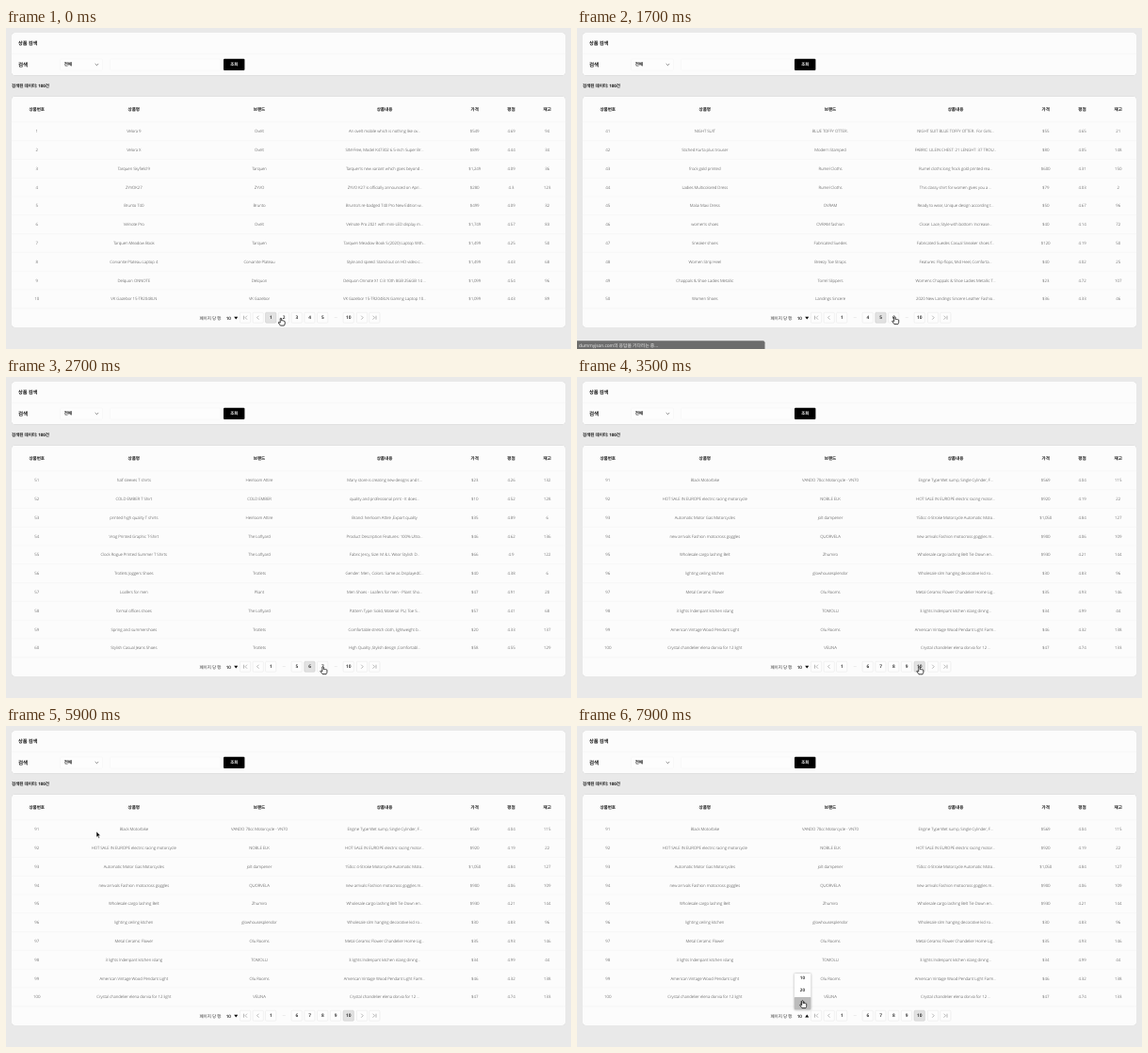
These frames come from a looping animation (600 by 341 pixels, 8 s). An HTML page:

```html
<!DOCTYPE html>
<html lang="ko">
<head>
<meta charset="utf-8">
<title>상품 검색</title>
<style>
html, body { margin: 0; width: 100%; height: 100%; overflow: hidden; background: #e9e9e9; }
svg { display: block; width: 600px; height: 341px; }
text {
  font-family: "Open Sans", "Noto Sans CJK KR", "Noto Sans CJK JP", "Noto Sans CJK", sans-serif;
  text-rendering: geometricPrecision; letter-spacing: -.02em; fill: #111;
}
.cell { font-weight: 300; fill: #333; }
.bold { font-weight: 700; }
.semi { font-weight: 600; }
.line { fill: none; stroke: #333; stroke-width: .6; }
.dim { stroke: #888; }
.card { fill: #fcfcfc; filter: drop-shadow(0 .7px .6px rgba(0, 0, 0, .28)); }
.rule { stroke: #f1f1f1; stroke-width: .5; }
.box { fill: #fdfdfd; stroke: #e4e4e4; stroke-width: .5; }
.on { fill: #e2e2e2; stroke: #c4c4c4; }
.field { fill: #fdfdfd; stroke: #f3f3f3; stroke-width: .5; }
.popup { fill: #fff; filter: drop-shadow(0 .5px 1px rgba(0, 0, 0, .35)); }
</style>
</head>
<body>
<svg id="stage" viewBox="0 0 600 341"></svg>
<script>
const LOOP = 8000, STEP = 100;
const COLS = [32.7, 135.8, 269, 402, 497.7, 536.5, 574.7];
const HEADS = ['상품번호', '상품명', '브랜드', '상품내용', '가격', '평점', '재고'];

// title | brand | description | price | rating | stock
const PAGES = {
  1: `Velora 9|Ovelt|An ovelt mobile which is nothing like ov...|549|4.69|94
Velora X|Ovelt|SIM-Free, Model K47302 6.5-inch Super Br...|899|4.44|34
Tarquen Skyfield 9|Tarquen|Tarquen's new variant which goes beyond ...|1,249|4.09|36
ZYVOK27|ZYVO|ZYVO K27 is officially announced on Apri...|280|4.3|123
Brunto T40|Brunto|Brunto's re-badged T40 Pro New Edition w...|499|4.09|32
Velnote Pro|Ovelt|Velnote Pro 2021 with mini-LED display m...|1,749|4.57|83
Tarquen Meadow Book|Tarquen|Tarquen Meadow Book S (2020) Laptop With...|1,499|4.25|50
Corvanite Plateau Laptop 4|Corvanite Plateau|Style and speed. Stand out on HD video c...|1,499|4.43|68
Delquon ONNOTE|Delquon|Delquon Onnote X1 Ci3 10th 8GB 256GB 14 ...|1,099|4.54|96
VK Gazebor 15-TR2048LN|VK Gazebor|VK Gazebor 15-TR2048LN Gaming Laptop 10...|1,099|4.43|89`,
  5: `NIGHT SUIT|BLUE TOFFY OTTER..|NIGHT SUIT BLUE TOFFY OTTER.. For Girls...|55|4.65|21
Stiched Kurta plus trouser|Modern Stamped|FABRIC: LILEIN CHEST: 21 LENGHT: 37 TROU...|80|4.05|148
frock gold printed|Rumel Cloths|Rumel cloths long frock gold printed rea...|600|4.31|150
Ladies Multicolored Dress|Rumel Cloths|This classy shirt for women gives you a ...|79|4.03|2
Malai Maxi Dress|OVRAM|Ready to wear, Unique design according t...|50|4.67|96
women's shoes|OVRAM fashion|Close: Lace, Style with bottom: Increase...|40|4.14|72
Sneaker shoes|Fabricated Suedes|Fabricated Suedes Casual Sneaker shoes f...|120|4.19|50
Women Strip Heel|Breezy Toe Straps|Features: Flip-flops, Mid Heel, Comforta...|40|4.02|25
Chappals &amp; Shoe Ladies Metallic|Torrel Slippers|Womens Chappals &amp; Shoe Ladies Metallic T...|23|4.72|107
Women Shoes|Landings Sincere|2020 New Landings Sincere Leather Fashio...|36|4.33|46`,
  6: `half sleeves T shirts|Heirloom Attire|Many store is creating new designs and t...|23|4.26|132
COLD EMBER T Shirt|COLD EMBER|quality and professional print - It does...|10|4.52|128
printed high quality T shirts|Heirloom Attire|Brand: heirloom Attire ,Export quality|35|4.89|6
Vrog Printed Graphic T-Shirt|The Loftyard|Product Description Features: 100% Ultra...|46|4.62|136
Clock Rogue Printed Summer T Shirts|The Loftyard|Fabric Jercy, Size: M &amp; L Wear Stylish D...|66|4.9|122
Trotlets Joggers Shoes|Trotlets|Gender: Men , Colors: Same as DisplayedC...|40|4.38|6
Loafers for men|Pliant|Men Shoes - Loafers for men - Pliant Sho...|47|4.91|20
formal offices shoes|The Loftyard|Pattern Type: Solid, Material: PU, Toe S...|57|4.41|68
Spring and summershoes|Trotlets|Comfortable stretch cloth, lightweight b...|20|4.33|137
Stylish Casual Jeans Shoes|Trotlets|High Quality ,Stylish design ,Comfortabl...|58|4.55|129`,
  10: `Black Motorbike|VANDO 70cc Motorcycle - VN70|Engine Type:Wet sump, Single Cylinder, F...|569|4.04|115
HOT SALE IN EUROPE electric racing motorcycle|NOBLE ELK|HOT SALE IN EUROPE electric racing motor...|920|4.19|22
Automatic Motor Gas Motorcycles|jolt dampener|150cc 4-Stroke Motorcycle Automatic Moto...|1,050|4.84|127
new arrivals Fashion motocross goggles|QUORVELA|new arrivals Fashion motocross goggles m...|900|4.06|109
Wholesale cargo lashing Belt|Zhumiro|Wholesale cargo lashing Belt Tie Down en...|930|4.21|144
lighting ceiling kitchen|glowhousesplendor|Wholesale slim hanging decorative kid ro...|30|4.83|96
Metal Ceramic Flower|Olu Rooms|Metal Ceramic Flower Chandelier Home Lig...|35|4.93|146
3 lights lndenpant kitchen islang|TOMOLU|3 lights lndenpant kitchen islang dining...|34|4.99|44
American Vintage Wood Pendant Light|Olu Rooms|American Vintage Wood Pendant Light Farm...|46|4.32|138
Crystal chandelier elena dorvia for 12 light|VEUNA|Crystal chandelier elena dorvia for 12 ...|47|4.74|133`
};
const PAGERS = { 1: '1 2 3 4 5 … 10', 5: '1 … 4 5 6 … 10', 6: '1 … 5 6 7 … 10', 10: '1 … 6 7 8 9 10' };

// Text is drawn large and scaled down, so no minimum font size applies.
const text = (x, y, s, size, cls, anchor = 'middle', extra = '') =>
  `<text transform="translate(${x} ${y}) scale(.1)" font-size="${size * 10}" class="${cls}" text-anchor="${anchor}" ${extra}>${s}</text>`;
const rect = (x, y, w, h, cls, r = 0, extra = '') =>
  `<rect x="${x}" y="${y}" width="${w}" height="${h}" rx="${r}" class="${cls}" ${extra}/>`;
const path = (d, cls, extra = '') => `<path d="${d}" class="${cls}" ${extra}/>`;
const rule = y => path(`M6 ${y}H594`, 'rule');
const rowY = i => 109.8 + 19.78 * i;

function pager(page) {
  const button = (x, on) => rect(x - 5.6, 302.2, 11.2, 11, on ? 'box on' : 'box', 1);
  let out = [254, 267.7, 378, 391.3].map(x => button(x)).join('') +
    path('M252.5 305.7v4M256 305.7l-2 2l2 2M268.5 305.7l-2 2l2 2', 'line dim') +
    path('M377.2 305.7l2 2l-2 2M389.5 305.7l2 2l-2 2M393 305.7v4', 'line dim');
  PAGERS[page].split(' ').forEach((label, i) => {
    const x = 281.2 + 13.75 * i;
    out += label === '…'
      ? text(x, 308.6, '···', 4.6, 'cell')
      : button(x, +label === page) + text(x, 309.4, label, 4.8, 'semi');
  });
  return out;
}

function table(page) {
  const rows = PAGES[page].split('\n').map((row, i) => {
    const cells = [(page - 1) * 10 + i + 1, ...row.split('|')];
    cells[4] = '$' + cells[4];
    return cells.map((s, c) => text(COLS[c], rowY(i) + 1.55, s, 4.4, 'cell')).join('');
  });
  return `<g id="page${page}">${rows.join('')}${pager(page)}</g>`;
}

const searchCard = rect(6, 5, 588, 45.2, 'card', 3) + rule(27.2) +
  text(13, 17.8, '상품 검색', 5.3, 'bold', 'start') +
  text(13, 40.7, '검색', 5.6, 'bold', 'start') +
  rect(57.5, 33, 45, 12, 'field', 1) + rect(110.5, 33, 117, 12, 'field', 1) +
  text(61.7, 40.3, '전체', 4.6, 'semi', 'start') +
  path('M94.7 38l1.7 1.7l1.7-1.7', 'line') +
  rect(231, 32.8, 22.4, 12.2, '', 1) +
  text(242.2, 40.4, '조회', 4.4, 'semi', 'middle', 'style="fill:#fff"');

const tableCard = rect(6, 72.8, 588, 245.2, 'card', 3) +
  HEADS.map((s, i) => text(COLS[i], 87.9, s, 4.6, 'bold')).join('') +
  Array.from({ length: 11 }, (_, i) => rule(rowY(i) - 9.9)).join('') +
  Object.keys(PAGES).map(p => table(+p)).join('') +
  text(205.5, 309.5, '페이지 당 행:', 4.55, 'cell', 'start') +
  text(236.2, 309.5, '10', 4.6, 'semi') +
  path('M242.2 306.8h4l-2 2.8z', '', 'id="down"') + path('M242.2 309.4h4l-2-2.8z', '', 'id="up"');

const popup = '<g id="popup">' + rect(230.8, 263, 17.6, 38.6, 'popup', .8) +
  rect(230.8, 288, 17.6, 13.4, '', .8, 'id="hover" fill="#bcbcbc"') +
  ['10', '20', '30'].map((s, i) => text(239.4, 268.9 + 13.4 * i, s, 4.6, 'semi')).join('') + '</g>';

const status = '<g id="status">' + path('M0 332.2H197.5q2 0 2 2V341H0z', '', 'fill="#6c6c6c"') +
  text(2, 338.5, 'dummyjson.com의 응답을 기다리는 중...', 4.9, '', 'start', 'style="fill:#eee"') + '</g>';

const cursor = '<g id="cursor">' +
  path('M0 0V6.2L1.4 4.9L2.4 7.2L3.4 6.8L2.4 4.6H4.3z', '', 'id="arrow" stroke="#fff" stroke-width=".5"') +
  path('M-.8 .6q.8-1 1.5 0V3q.8-.5 1.3.1q.8-.4 1.2.2q1-.2 1 .8V6q0 .9-.8 2.1H-.6Q-1.6 6.7-2.8 5q0-1.2 2 .2z',
    '', 'id="hand" fill="#fff" stroke="#111" stroke-width=".8"') + '</g>';

document.getElementById('stage').innerHTML = searchCard +
  text(6, 63.1, '검색된 데이터: 100건', 4.6, 'bold', 'start') + tableCard + popup + status + cursor;

// time, x, y of the pointer tip
const TRAIL = [
  [0, 292, 308], [300, 294.5, 307], [400, 294.5, 307], [900, 338, 306], [1400, 338, 306],
  [1700, 337.5, 306.5], [2000, 360, 307], [2500, 337, 307], [2700, 336.7, 307.5],
  [3200, 363, 308], [3700, 364, 307.5], [4000, 364, 307.5], [4200, 243.5, 301.6],
  [4400, 231, 296.8], [4500, 231, 296.8], [4800, 177, 123.5], [4900, 177, 123.5],
  [5200, 78, 61], [5500, 194.5, 234.5], [5700, 194.5, 234.5], [5900, 96, 112],
  [6000, 96, 112], [6200, 198.5, 295], [6400, 198.5, 295], [7000, 238, 309],
  [7500, 238, 309], [7900, 239.5, 291.5], [8000, 239.5, 291.5]
];
const $ = id => document.getElementById(id);
const show = (id, on) => { $(id).style.display = on ? '' : 'none'; };
const ramp = (t, a, b) => Math.min(1, Math.max(0, (t - a) / (b - a)));

function pointerAt(t) {
  const i = Math.max(1, TRAIL.findIndex(k => k[0] > t));
  const [t0, x0, y0] = TRAIL[i - 1], [t1, x1, y1] = TRAIL[i];
  const p = ramp(t, t0, t1);
  return [x0 + (x1 - x0) * p, y0 + (y1 - y0) * p];
}

function draw(now) {
  const t = Math.floor(now % LOOP / STEP) * STEP;
  const page = t < 1400 ? 1 : t < 2600 ? 5 : t < 3400 ? 6 : 10;
  Object.keys(PAGES).forEach(p => show('page' + p, +p === page));

  const open = t >= 7200, hand = t < 4100 || t >= 6900;
  show('popup', open);
  show('up', open);
  show('down', !open);
  show('hover', t >= 7700);
  show('hand', hand);
  show('arrow', !hand);
  $('status').style.opacity = ramp(t, 1400, 1600) * (1 - ramp(t, 2200, 2500));
  $('cursor').setAttribute('transform', `translate(${pointerAt(t).join(' ')})`);
}

const start = performance.now();
(function tick() {
  draw(performance.now() - start);
  requestAnimationFrame(tick);
})();
</script>
</body>
</html>
```
